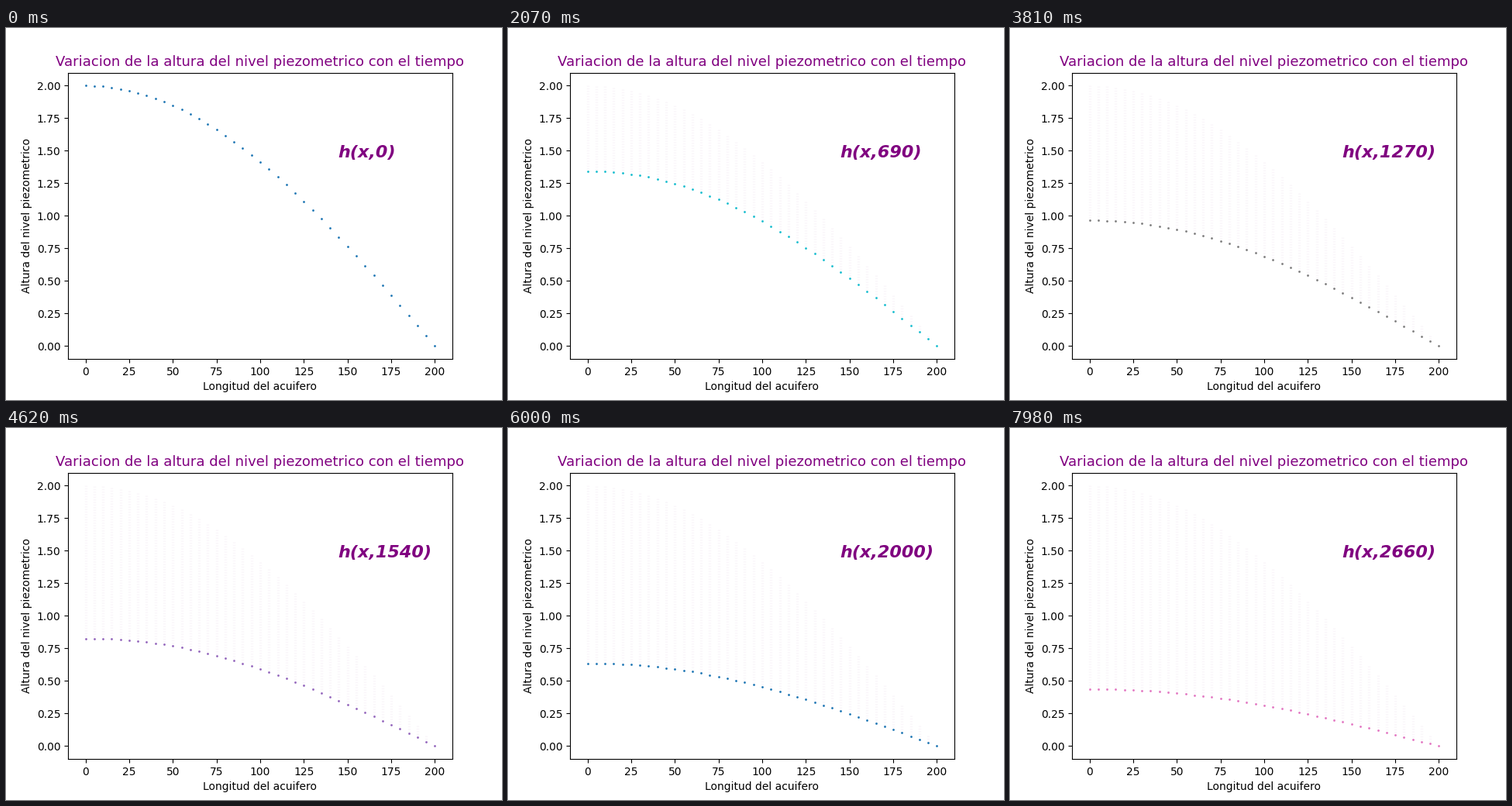
These frames come from a looping animation (640 by 480 pixels, 8000 ms). A matplotlib script:

```python
import numpy as np
import matplotlib.pyplot as plt
from matplotlib.animation import FuncAnimation

LOOP_MS = 8000
FRAMES = 267
STEPS = 10            # time units per frame
LENGTH, DX = 200, 5
DIFFUSIVITY = 9.0

plt.rcParams["font.family"] = "DejaVu Sans"


def solve(x):
    """Explicit diffusion: sealed left end, drained right end."""
    h = 2 * np.cos(np.pi * x / (2 * LENGTH))
    ratio = DIFFUSIVITY / DX**2
    levels = [h.copy()]
    for _ in range(FRAMES - 1):
        for _ in range(STEPS):
            h[1:-1] += ratio * (h[2:] - 2 * h[1:-1] + h[:-2])
            h[0] = h[1]
        levels.append(h.copy())
    return levels


x = np.arange(0, LENGTH + DX, DX)
levels = solve(x)

fig, ax = plt.subplots(figsize=(6.4, 4.8), dpi=100)
ax.set_xlim(-10, 210)
ax.set_ylim(-0.1, 2.1)
ax.set_title("Variacion de la altura del nivel piezometrico con el tiempo",
             fontsize=13, color="purple")
ax.set_xlabel("Longitud del acuifero")
ax.set_ylabel("Altura del nivel piezometrico")

trail = ax.vlines(x, levels[0], levels[0], color="#faf6fa", lw=2.4,
                  linestyles=(0, (0.4, 0.6)), zorder=1)
dots, = ax.plot(x, levels[0], ".", ms=2)
label = ax.text(144.5, 1.45, "", fontsize=16, color="purple",
                weight="bold", style="italic")


def update(i):
    h = levels[i]
    trail.set_segments([[(a, top), (a, low)]
                        for a, top, low in zip(x, levels[0], h)])
    trail.set_visible(i > 0)
    dots.set_ydata(h)
    dots.set_color(f"C{i % 10}")
    label.set_text(f"h(x,{i * STEPS})")
    return trail, dots, label


anim = FuncAnimation(fig, update, frames=FRAMES, interval=LOOP_MS / FRAMES,
                     repeat=True, repeat_delay=0)
plt.show()
```
